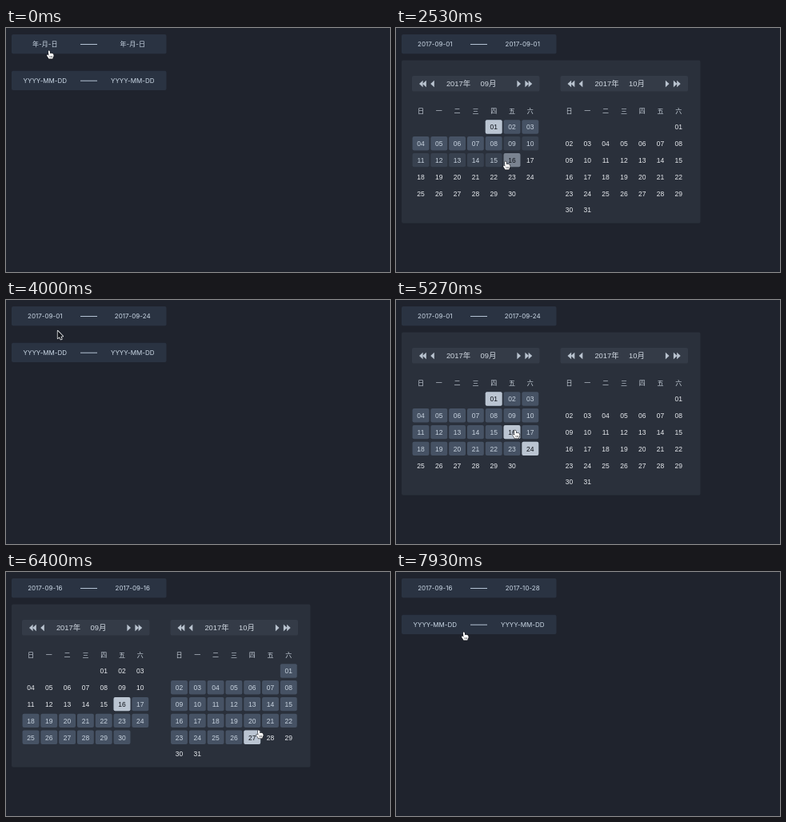
An HTML page with a canvas that plays this animation: 480x306 px, repeating every 8000 ms.

```html
<!DOCTYPE html>
<html lang="zh">
<head>
<meta charset="utf-8">
<title>Date range picker</title>
<style>
html, body { margin: 0; width: 100%; height: 100%; overflow: hidden; background: #1f232d; }
canvas { display: block; width: 480px; height: 306px; }
</style>
</head>
<body>
<canvas id="stage"></canvas>
<script>
const W = 480, H = 306, LOOP = 8000, FADE = 120, SAMPLES = 12;
const canvas = document.getElementById('stage');
const ctx = canvas.getContext('2d');
const ratio = Math.max(1, window.devicePixelRatio || 1);
canvas.width = W * ratio;
canvas.height = H * ratio;

const INPUT_FONT = '8px Inter, "Noto Sans CJK SC", sans-serif';
const WEEK_FONT = '8px "Noto Sans CJK SC", sans-serif';
const CELL_FONT = '8.5px "Liberation Sans", sans-serif';
const HEAD_FONT = '9.4px "Liberation Sans", "Noto Sans CJK SC", sans-serif';
const STEP_X = 22.8, STEP_Y = 20.8, ROW_Y = 124;
const CELL_W = 20.9, CELL_H = 17.4;

// Days are numbered through both months: 1-30 and 31-61.
const MONTHS = [
  { x: 31, bar: 20, name: '09月', skip: 4, days: 30, first: 1 },
  { x: 216.5, bar: 205.5, name: '10月', skip: 6, days: 31, first: 31 }
];

// Eased pointer moves: start, end, x, y; it rests in between.
const HOME = { x: 54, y: 28 };
const MOVES = [
  [0, 600, 41, 20],
  [1200, 1560, 122.5, 124],
  [1560, 1730, 125, 133],
  [2390, 2530, 137, 167],
  [2530, 3200, 167, 184],
  [3270, 4070, 62, 35],
  [4130, 4270, 60, 25],
  [4670, 5220, 149, 163],
  [5670, 6350, 316, 198],
  [6530, 6670, 340, 206],
  [6930, 7130, 337, 206],
  [7560, 7930, 85, 75]
];

// Each phase holds until its end time.
const PHASES = [
  { until: 1860, from: 0, to: 0, dates: ['年-月-日', '年-月-日'] },
  { until: 3230, from: 1, to: 0, dates: ['2017-09-01', '2017-09-01'] },
  { until: 5420, from: 1, to: 24, dates: ['2017-09-01', '2017-09-24'] },
  { until: 7230, from: 16, to: 0, dates: ['2017-09-16', '2017-09-16'] },
  { until: LOOP + 1, from: 16, to: 58, dates: ['2017-09-16', '2017-10-28'] }
];
const OPENINGS = [[760, 3230], [4300, 7230]];

const clamp = (v, lo, hi) => Math.min(hi, Math.max(lo, v));
const smooth = u => u * u * (3 - 2 * u);
const phaseAt = t => PHASES.find(p => t < p.until);
const isOpen = t => OPENINGS.some(([a, b]) => t >= a && t < b);

function panelAlpha(t) {
  return Math.max(...OPENINGS.map(([a, b]) =>
    Math.min(clamp((t - a) / 80, 0, 1), clamp((b + 80 - t) / 80, 0, 1))));
}

function pointerAt(t) {
  let { x, y } = HOME;
  for (const [start, end, toX, toY] of MOVES) {
    const k = smooth(clamp((t - start) / (end - start), 0, 1));
    x += (toX - x) * k;
    y += (toY - y) * k;
  }
  return { x, y };
}

function hoverAt(t) {
  if (!isOpen(t)) return 0;
  const { x, y } = pointerAt(t);
  const row = Math.round((y - ROW_Y) / STEP_Y);
  if (row < 0 || row > 5) return 0;
  const m = MONTHS[x < 193 ? 0 : 1];
  const col = clamp(Math.round((x - m.x) / STEP_X), 0, 6);
  const day = row * 7 + col - m.skip;
  return day < 0 || day >= m.days ? 0 : m.first + day;
}

function snapshot(t) {
  const { from, to } = phaseAt(t), hover = hoverAt(t);
  return { from, to, hover, last: to || Math.max(from, hover) };
}

// 2: end of range or hovered, 1: inside the range, 0: plain
function level(day, s) {
  if (day === s.from || day === s.to || day === s.hover) return 2;
  return s.from && day > s.from && day < s.last ? 1 : 0;
}

function box(x, y, w, h, r, color) {
  ctx.fillStyle = color;
  ctx.beginPath();
  ctx.roundRect(x, y, w, h, r);
  ctx.fill();
}

function label(text, x, y, font, color) {
  ctx.font = font;
  ctx.fillStyle = color;
  ctx.fillText(text, x, y);
}

function trace(points) {
  ctx.beginPath();
  points.forEach(([x, y]) => ctx.lineTo(x, y));
  ctx.closePath();
}

function dateInput(y, [a, b]) {
  box(7, y, 193.5, 24.3, 2, '#2a3342');
  label(a, 48.8, y + 12.7, INPUT_FONT, '#cbd8e6');
  label(b, 158.2, y + 12.7, INPUT_FONT, '#cbd8e6');
  box(93, y + 12, 21, 1, 0, '#b4c3d4');
}

function triangle(x, dir) {
  trace([[x, 70], [x + dir * 4.6, 65.8], [x + dir * 4.6, 74.2]]);
  ctx.fillStyle = '#b9c3cf';
  ctx.fill();
}

function monthHead(m) {
  const x = m.bar;
  box(x, 60, 159.5, 19.6, 2, '#343b47');
  [9, 13.2, 23.2].forEach(d => {
    triangle(x + d, 1);
    triangle(x + 159.2 - d, -1);
  });
  label('2017年', x + 58, 70.3, HEAD_FONT, '#d0d8e1');
  label(m.name, x + 95.5, 70.3, HEAD_FONT, '#d0d8e1');
  [...'日一二三四五六'].forEach((c, i) =>
    label(c, m.x + i * STEP_X, 104.3, WEEK_FONT, '#c8d1db'));
}

// Range colours fade both ways; the end colour fades in and leaves at once.
function dayCell(m, n, past, alpha) {
  const day = m.first + n, slot = n + m.skip;
  const x = m.x + slot % 7 * STEP_X;
  const y = ROW_Y + Math.floor(slot / 7) * STEP_Y;
  const levels = past.map(s => level(day, s));
  const now = levels[0];
  const fill = (min, color) => {
    ctx.globalAlpha = alpha * levels.filter(v => v >= min).length / SAMPLES;
    box(x - CELL_W / 2, y - CELL_H / 2, CELL_W, CELL_H, 2, color);
  };
  fill(1, '#465264');
  if (now === 2) fill(2, '#bbc5d2');
  ctx.globalAlpha = alpha;
  const color = ['#e8ebef', '#c8d3df', '#0e1218'][now];
  label(String(n + 1).padStart(2, '0'), x, y + 1, CELL_FONT, color);
}

function panel(t, alpha) {
  const past = Array.from({ length: SAMPLES }, (_, i) =>
    snapshot(Math.max(0, t - i * FADE / SAMPLES)));
  ctx.globalAlpha = alpha;
  box(7, 40.5, 373.5, 204.3, 2, '#2a303b');
  for (const m of MONTHS) {
    monthHead(m);
    for (let n = 0; n < m.days; n++) dayCell(m, n, past, alpha);
  }
  ctx.globalAlpha = 1;
}

function overInput({ x, y }, open) {
  if (x < 7 || x > 200) return false;
  return (y >= 8 && y <= 32) || (!open && y >= 54 && y <= 78);
}

function hand() {
  ctx.beginPath();
  ctx.moveTo(-1.2, 1.2);
  ctx.quadraticCurveTo(-0.2, -0.5, 0.8, 1.2);
  ctx.lineTo(1.2, 4);
  ctx.quadraticCurveTo(3.6, 3.2, 5.2, 4.8);
  ctx.quadraticCurveTo(6.4, 6.6, 4.5, 9.4);
  ctx.lineTo(4.4, 10.6);
  ctx.lineTo(-0.6, 10.6);
  ctx.quadraticCurveTo(-1, 9, -2.8, 6.9);
  ctx.quadraticCurveTo(-3.2, 5.2, -1.7, 5.6);
  ctx.lineTo(-0.5, 6.7);
  ctx.closePath();
  ctx.lineWidth = 1.1;
  ctx.strokeStyle = '#10131a';
  ctx.stroke();
  ctx.fillStyle = '#ffffff';
  ctx.fill();
  ctx.lineWidth = 0.5;
  ctx.beginPath();
  [0.9, 2.3, 3.7].forEach(x => { ctx.moveTo(x, 7); ctx.lineTo(x, 9.2); });
  ctx.stroke();
}

function arrow() {
  trace([[0.4, 0.5], [0.4, 10.1], [2.6, 8], [4.1, 11.4], [5.6, 10.8],
    [4.2, 7.5], [7.1, 7.3]]);
  ctx.lineWidth = 1.5;
  ctx.strokeStyle = '#f2f4f6';
  ctx.stroke();
  ctx.fillStyle = '#12151b';
  ctx.fill();
}

function pointer(t) {
  const p = pointerAt(t);
  ctx.save();
  ctx.translate(p.x, p.y);
  if (overInput(p, isOpen(t)) || hoverAt(t)) hand();
  else arrow();
  ctx.restore();
}

function draw(t) {
  ctx.setTransform(ratio, 0, 0, ratio, 0, 0);
  ctx.textAlign = 'center';
  ctx.textBaseline = 'middle';
  ctx.lineJoin = 'round';
  box(0, 0, W, H, 0, '#1f232d');
  dateInput(8, phaseAt(t).dates);
  dateInput(53.7, ['YYYY-MM-DD', 'YYYY-MM-DD']);
  const alpha = panelAlpha(t);
  if (alpha > 0) panel(t, alpha);
  pointer(t);
}

const start = performance.now();
function tick() {
  draw((performance.now() - start) % LOOP);
  requestAnimationFrame(tick);
}
tick();
</script>
</body>
</html>
```
